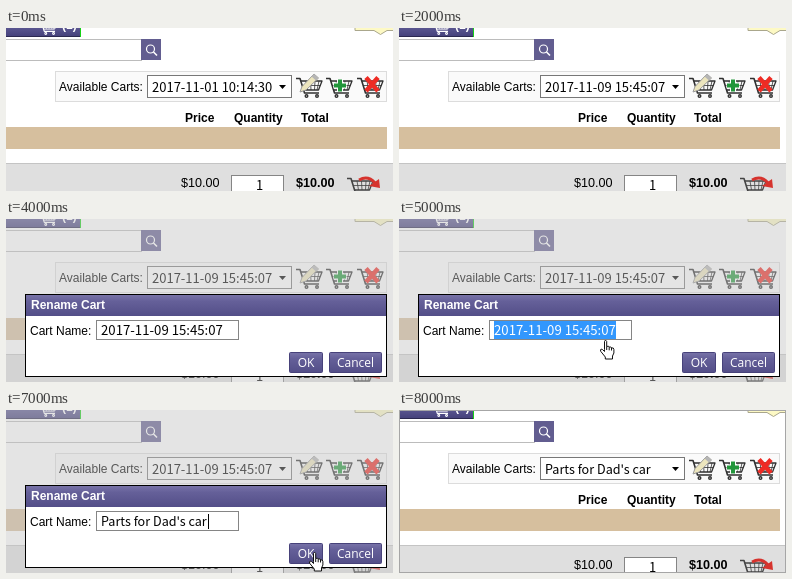
Write an HTML page that moves like this. It is 387 px wide and 163 px high and loops after 9000 ms.

```html
<!DOCTYPE html>
<html lang="en">
<head>
<meta charset="utf-8">
<title>Rename a cart</title>
<style>
html, body { margin: 0; width: 100%; height: 100%; overflow: hidden; background: #fff; }
svg { display: block; width: 387px; height: 163px; }
text { font: 12px "Liberation Sans", Arial, sans-serif; white-space: pre; }
.b { font-weight: bold; }
.price { font-size: 12.6px; }
.field { font: 13px "Noto Sans CJK JP", "Noto Sans CJK SC", "Open Sans", sans-serif; }
.entry { font-size: 13.2px; }
.name { font-size: 12.6px; }
.button { font: 12px "Open Sans", sans-serif; fill: #fff; }
.crisp { shape-rendering: crispEdges; }
</style>
</head>
<body>
<svg viewBox="0 0 387 163">
  <defs>
    <linearGradient id="tab" x2="0" y2="1">
      <stop stop-color="#59558f"/><stop offset="1" stop-color="#44407a"/>
    </linearGradient>
    <linearGradient id="bar" x2="0" y2="1">
      <stop stop-color="#7873a8"/><stop offset=".3" stop-color="#656099"/><stop offset="1" stop-color="#534e88"/>
    </linearGradient>
    <g id="cart" fill="none" stroke-linejoin="round">
      <path d="M0 3.500H4L8.500 18H23" stroke-width="1.6"/>
      <path d="M5 6H26L22.5 15H8" stroke-width="1.3"/>
      <path d="M6 10.500H24.500M10 6L11.5 15M14.5 6L15 15M19 6L18.5 15M23 6L21 15" stroke-width=".8"/>
      <circle cx="10.5" cy="21" r="1.3" stroke-width="1.4"/>
      <circle cx="21" cy="21" r="1.3" stroke-width="1.4"/>
    </g>
    <path id="hand" transform="translate(-.5 -.5)" d="M5 10V2Q5 1 6 1T7.2 2V7Q9.4 6 9.7 7.6 11.7 6.9 12 8.4 14.3 7.8 14.4 10V13.5L13 16.5V19.5H5.800V17.5L1.2 11.8Q.6 10.2 1.6 9.6 2.8 9.3 5 12Z M7.2 7V10.5M9.7 7.6V10.8M12 8.4V11" fill="#fff" stroke="#111"/>
  </defs>

  <rect width="387" height="163" fill="#fff"/>
  <g id="page">
    <g class="crisp">
      <rect width="74" height="9" fill="url(#tab)"/>
      <rect y="8" width="74" height="1" fill="#2b2850"/>
      <rect x="74" width="1" height="9" fill="#16d116"/>
    </g>
    <use href="#cart" transform="translate(32 -10) scale(.74)" stroke="#fff"/>
    <text x="56" y="1" class="b" fill="#fff">(1)</text>
    <path d="M349 -1V2.500H368L374.500 6.500 381 2.500H388V-1Z" fill="#fdf9c4" stroke="#aaa78c"/>

    <rect class="crisp" x="-.5" y="11.5" width="136" height="21" fill="#fff" stroke="#bcbcbc"/>
    <rect class="crisp" x="135" y="11" width="20" height="21" fill="#625d90"/>
    <circle cx="144.500" cy="21" r="4" fill="none" stroke="#fff" stroke-width="1.2"/>
    <path d="M147.500 24L151 27.500" stroke="#fff" stroke-width="1.6"/>

    <rect class="crisp" x="49.5" y="43.5" width="331" height="30" fill="#fafafa" stroke="#dcdcdc"/>
    <text x="53" y="63">Available Carts:</text>
    <rect class="crisp" x="141.5" y="47.5" width="144" height="22" fill="#fff" stroke="#777"/>
    <text id="choice" x="146" y="64" class="field"></text>
    <path d="M273 57H280L276.5 61Z"/>

    <g stroke="#303030">
      <use href="#cart" x="290" y="47"/>
      <use href="#cart" x="320" y="47"/>
      <use href="#cart" x="351" y="47"/>
    </g>
    <path d="M294 64L296 58.500 308 46 312.500 50 300 62Z" fill="#ece5bd" stroke="#999"/>
    <path d="M308 46L312.500 50 310 52.500 305.500 48.500Z" fill="#b5b5b5"/>
    <path d="M334 51V64M327.5 57.5H340.5" stroke="#fff" stroke-width="6"/>
    <path d="M334 51.5V63.5M328 57.5H340" stroke="#22963b" stroke-width="4"/>
    <path d="M360 49.500L372 63M372 49.500L360 63" stroke="#ee2b24" stroke-width="4.5"/>

    <text x="179" y="94" class="b">Price</text>
    <text x="228" y="94" class="b">Quantity</text>
    <text x="295" y="94" class="b">Total</text>
    <g class="crisp">
      <rect y="99" width="381" height="22" fill="#d6bf9e"/>
      <rect y="135" width="387" height="28" fill="#dfdfdf"/>
      <rect y="135" width="387" height="1" fill="#c4c4c4"/>
      <rect x="225.500" y="147.500" width="52" height="20" fill="#fff" stroke="#858585"/>
    </g>
    <text x="175" y="159" class="price">$10.00</text>
    <text x="250" y="162" class="field">1</text>
    <text x="290" y="159" class="price b">$10.00</text>
    <use href="#cart" x="341" y="147" stroke="#444"/>
    <path d="M353 152Q362 147 369 155" fill="none" stroke="#d6332d" stroke-width="3"/>
    <path d="M363 158L373 151 374 160Z" fill="#d6332d"/>
  </g>

  <rect id="veil" width="387" height="163" fill="#c4c4c4" opacity=".45"/>

  <g id="dialog">
    <g class="crisp">
      <rect x="19.500" y="75.500" width="361" height="82" fill="#fff" stroke="#000"/>
      <rect x="20" y="76" width="360" height="21" fill="url(#bar)"/>
      <rect x="90.500" y="101.500" width="142" height="19" fill="#fff" stroke="#858585"/>
      <rect id="selection" x="95" y="102" width="122" height="18" fill="#3297fd"/>
    </g>
    <text x="25" y="90" class="b" fill="#fff">Rename Cart</text>
    <text x="24" y="116">Cart Name:</text>
    <text id="entry" x="95" y="116" class="field entry"></text>
    <rect id="caret" class="crisp" y="104" width="1" height="15"/>
    <g fill="url(#bar)" stroke="#47427a">
      <rect x="283.500" y="133.500" width="33" height="20" rx="1"/>
      <rect x="323.500" y="133.500" width="52" height="20" rx="1"/>
    </g>
    <text x="300" y="148" class="button" text-anchor="middle">OK</text>
    <text x="349.500" y="148" class="button" text-anchor="middle">Cancel</text>
  </g>

  <use id="pointer" href="#hand"/>
  <rect id="edge" class="crisp" x=".5" y=".5" width="386" height="162" fill="none" stroke="#a6a6a6"/>
</svg>
<script>
const LOOP = 9000;
const OLD = "2017-11-01 10:14:30";
const FRESH = "2017-11-09 15:45:07";
const NAMED = "Parts for Dad's car";

const steps = [
  { at: 0, choice: OLD },
  { at: 1000, choice: OLD, pointer: [330, 70] },
  { at: 2000, choice: FRESH },
  { at: 3000, choice: FRESH, pointer: [300, 69] },
  { at: 4000, choice: FRESH, entry: FRESH },
  { at: 5000, choice: FRESH, entry: FRESH, selected: true, pointer: [201, 121] },
  { at: 6000, choice: FRESH, entry: NAMED },
  { at: 7000, choice: FRESH, entry: NAMED, pointer: [303, 142] },
  { at: 8000, choice: NAMED, edge: true }
];

const $ = id => document.getElementById(id);
const show = (id, on) => { $(id).style.display = on ? "" : "none"; };

function write(id, value) {
  $(id).textContent = value;
  $(id).classList.toggle("name", value === NAMED);
}

function render(step) {
  const { choice, entry = "", selected, pointer, edge } = step;
  write("choice", choice);
  write("entry", entry);
  $("entry").setAttribute("fill", selected ? "#fff" : "#000");
  show("veil", entry);
  show("dialog", entry);
  show("selection", selected);
  show("caret", entry === NAMED);
  if (entry === NAMED) {
    $("caret").setAttribute("x", Math.round(96 + $("entry").getComputedTextLength()));
  }
  show("pointer", pointer);
  if (pointer) $("pointer").setAttribute("transform", `translate(${pointer})`);
  show("edge", edge);
}

const start = performance.now();
let current;

function tick() {
  const time = (performance.now() - start) % LOOP;
  const step = steps.filter(s => s.at <= time).pop();
  if (step !== current) render(current = step);
  requestAnimationFrame(tick);
}
tick();
</script>
</body>
</html>
```
